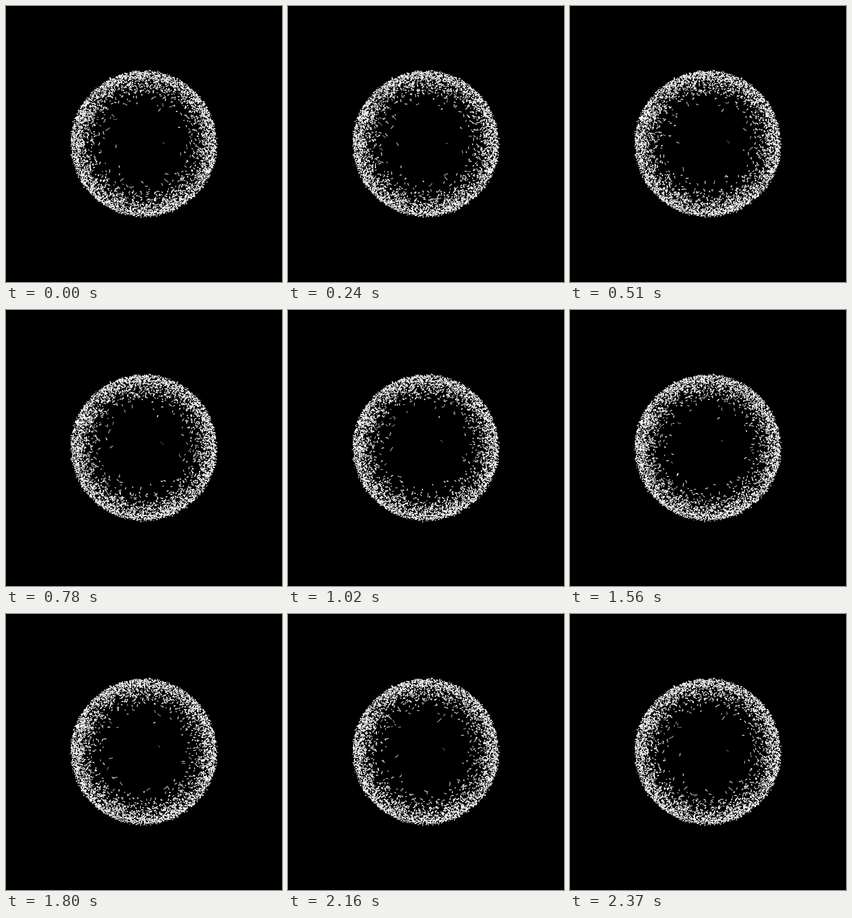
Animation, 540 px wide and 540 px high, one loop 2400 ms. Source, as an HTML page with a canvas:

```html
<!DOCTYPE html>
<html lang="en">
<head>
<meta charset="utf-8">
<title>Particle ring</title>
<style>
html, body { margin: 0; width: 100%; height: 100%; overflow: hidden; background: #000; }
canvas { display: block; }
</style>
</head>
<body>
<canvas id="stage" width="540" height="540"></canvas>
<script>
const ctx = document.getElementById('stage').getContext('2d');
const SIZE = 540, LOOP = 2400, STEP = 30, TAU = Math.PI * 2;
const CENTER = 269.5, RADIUS = 142, INNER = 68, COUNT = 5000;
const CROWDING = 10.5; // how strongly particles gather at the rim
const TRAIL = 0.12;    // share of the loop covered by one streak
const PARTS = 4;

let seed = 20177;
function rand() {
  seed = (seed + 0x6D2B79F5) | 0;
  let v = Math.imul(seed ^ (seed >>> 15), 1 | seed);
  v = (v + Math.imul(v ^ (v >>> 7), 61 | v)) ^ v;
  return ((v ^ (v >>> 14)) >>> 0) / 4294967296;
}
const between = (a, b) => a + (b - a) * rand();
const phase = () => rand() * TAU;

// Closed path around (x, y): one slow turn plus a smaller double-speed one.
function drifter(x, y, amp, width, phaseX, phaseY, ripple) {
  const rippleX = phase(), rippleY = phase();
  return {
    width,
    depth: RADIUS - Math.hypot(x - CENTER, y - CENTER),
    at(t) {
      const w = t * TAU;
      return [
        x + amp * (Math.cos(w - phaseX) + ripple * Math.cos(2 * w - rippleX)),
        y + amp * (Math.cos(w - phaseY) + ripple * Math.cos(2 * w - rippleY))
      ];
    }
  };
}

// Particles deeper inside wander further.
function ringParticle() {
  let r;
  do r = RADIUS * Math.pow(rand(), 1 / CROWDING); while (r < INNER);
  const depth = RADIUS - r;
  const angle = phase();
  const reach = r + between(-1.7, 1.7) + between(-1.7, 1.7);
  return drifter(
    CENTER + reach * Math.cos(angle),
    CENTER + reach * Math.sin(angle),
    (0.45 + depth * 0.066) * between(0.7, 1.2),
    between(1.1, 2.2),
    phase(), phase(), 0.45
  );
}

const particles = Array.from({ length: COUNT }, ringParticle);
// Two strays near the middle.
particles.push(
  drifter(303.5, 261.5, 7.5, 1, 0.7, 0.4, 0.1),
  drifter(207.5, 275, 8, 1.8, 0.3, 4.6, 0.1)
);
particles.sort((p, q) => q.depth - p.depth);

function streak(p, t) {
  let [x, y] = p.at(t - TRAIL / 2), length = 0;
  ctx.beginPath();
  ctx.moveTo(x, y);
  for (let i = 1; i <= PARTS; i++) {
    const [nx, ny] = p.at(t + TRAIL * (i / PARTS - 0.5));
    length += Math.hypot(nx - x, ny - y);
    ctx.lineTo(nx, ny);
    x = nx;
    y = ny;
  }
  // Longer streaks spread the same light thinner.
  ctx.globalAlpha = 1 / (1 + Math.max(0, length - 1.2) * 0.13);
  ctx.lineWidth = p.width;
  ctx.stroke();
}

function draw(t) {
  ctx.globalAlpha = 1;
  ctx.fillStyle = '#000';
  ctx.fillRect(0, 0, SIZE, SIZE);
  ctx.strokeStyle = '#fff';
  ctx.lineCap = ctx.lineJoin = 'round';
  for (const p of particles) streak(p, t);
}

let last = -1;
function tick() {
  const step = Math.floor((performance.now() % LOOP) / STEP);
  if (step !== last) {
    last = step;
    draw(step * STEP / LOOP);
  }
  requestAnimationFrame(tick);
}
tick();
</script>
</body>
</html>
```
